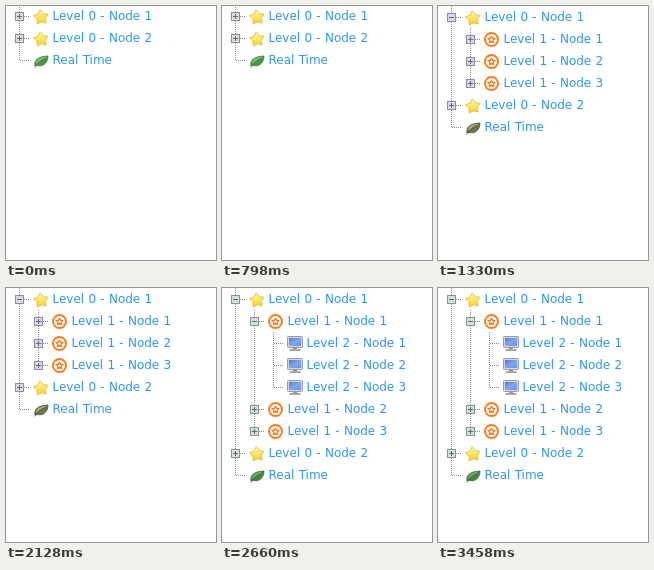
An HTML page that plays this animation: 210x254 px, repeating every 3.99 s.

```html
<!DOCTYPE html>
<html lang="en">
<head>
<meta charset="utf-8">
<title>Tree view</title>
<style>
  html, body { margin: 0; width: 100%; height: 100%; overflow: hidden; background: #fff; }
  svg { display: block; }
  text { font: 12px Verdana, "DejaVu Sans", sans-serif; word-spacing: .45px; fill: #3096ec; }
  .dots { fill: none; stroke: #858585; stroke-dasharray: 1 1; }
  .box { fill: var(--box); stroke: var(--rim); }
  .sign { stroke: var(--sign); }
</style>
</head>
<body>
<svg width="210" height="254" viewBox="0 0 210 254">
  <defs>
    <linearGradient id="gold" x2="0" y2="1">
      <stop offset="0" stop-color="#fffbb4"/><stop offset=".5" stop-color="#ffe95c"/><stop offset="1" stop-color="#f8c531"/>
    </linearGradient>
    <linearGradient id="screen" x2="1" y2="1">
      <stop offset="0" stop-color="#4f7cd6"/><stop offset=".5" stop-color="#7fa6ee"/><stop offset="1" stop-color="#6a94e6"/>
    </linearGradient>
    <path id="star" fill="url(#gold)" stroke="#e9bf45" stroke-linejoin="round"/>
    <g id="ring">
      <circle cx="7.5" cy="7.5" r="6.5" fill="#fff" stroke="#fb7c1c" stroke-width="2"/>
      <path id="ringStar" fill="#fff" stroke="#fb7c1c" stroke-width="1.4" stroke-linejoin="round"/>
    </g>
    <g id="monitor">
      <rect x=".5" y=".5" width="15" height="11" rx="1" fill="#d5d7db" stroke="#9a9ca2"/>
      <rect x="2" y="2" width="12" height="8" fill="url(#screen)"/>
      <path d="M6 12h4v1h-4z" fill="#8e9096"/>
      <rect x="2.500" y="13" width="11" height="2" rx=".5" fill="#a5a7ac"/>
    </g>
    <g id="leaf">
      <path d="M2 13C1 7 5 3.500 15 3C15 9 11 14 4.500 12.500Z" fill="var(--leaf)" stroke="var(--edge)" stroke-width=".8" stroke-linejoin="round"/>
      <path d="M3 11C3 7 6 4.500 14 3.800C10 6 7 8 3 11Z" fill="var(--shine)"/>
      <path d="M1.500 14.500C5 9.500 8 7.500 12 5.800" fill="none" stroke="var(--edge)" stroke-width=".8"/>
    </g>
  </defs>
  <g id="tree"></g>
</svg>
<script>
const ROW = 22, INDENT = 19, STEP = 1330;
const tree = document.getElementById("tree");

// Colours for each expansion depth.
const themes = [
  { leaf: "#4c9448", edge: "#3b7a3c", shine: "#86bf7c", box: "#dcdcdc", rim: "#8c8c8c", sign: "#666" },
  { leaf: "#6f764a", edge: "#4a4e36", shine: "#a3a97c", box: "#dad8e6", rim: "#8f8ca0", sign: "#69667c" },
  { leaf: "#478543", edge: "#3a6b3a", shine: "#78a870", box: "#d6e0da", rim: "#88938d", sign: "#5f6c65" }
];

function starPath(cx, cy, outer, inner, turn) {
  let d = "";
  for (let i = 0; i < 10; i++) {
    const a = (i * 36 - 90 + turn) * Math.PI / 180, r = i % 2 ? inner : outer;
    d += (i ? "L" : "M") + (cx + r * Math.cos(a)).toFixed(2) + " " + (cy + r * Math.sin(a)).toFixed(2);
  }
  return d + "Z";
}
document.getElementById("star").setAttribute("d", starPath(8, 8.4, 7.7, 4.3, -6));
document.getElementById("ringStar").setAttribute("d", starPath(7.5, 7.7, 3.5, 1.8, 0));

const node = (level, n, open) => ({ level, open, label: `Level ${level} - Node ${n}`, icon: ["star", "ring", "monitor"][level], leaf: level === 2 });

// Visible rows after a number of expansions.
function rowsAt(depth) {
  const rows = [node(0, 1, depth > 0)];
  if (depth > 0) {
    for (let n = 1; n <= 3; n++) {
      rows.push(node(1, n, n === 1 && depth > 1));
      if (n === 1 && depth > 1) for (let k = 1; k <= 3; k++) rows.push(node(2, k));
    }
  }
  rows.push(node(0, 2), { level: 0, label: "Real Time", icon: "leaf", leaf: true });
  return rows;
}

function toggle(x, y, open) {
  return `<rect class="box" x="${x - 3.5}" y="${y - 3.5}" width="8" height="8"/>
    <path class="sign" d="M${x - 2} ${y + .5}h5${open ? "" : `M${x + .5} ${y - 2}v5`}"/>`;
}

function draw(depth) {
  const rows = rowsAt(depth);
  let lines = "", parts = "";
  for (let level = 0; level <= depth; level++) {
    const first = rows.findIndex(r => r.level === level);
    const last = rows.map(r => r.level).lastIndexOf(level);
    lines += `<path class="dots" d="M${13.5 + level * INDENT} ${first * ROW - 1}V${last * ROW + 11}"/>`;
  }
  rows.forEach((r, i) => {
    const x = 13 + r.level * INDENT, y = 10 + i * ROW;
    lines += `<path class="dots" d="M${x + 1} ${y + .5}H${x + 10}"/>`;
    if (!r.leaf) parts += toggle(x, y, r.open);
    parts += `<use href="#${r.icon}" x="${x + 14}" y="${y - 7}"/><text x="${x + 33.5}" y="${y + 4}">${r.label}</text>`;
  });
  for (const [name, color] of Object.entries(themes[depth])) tree.style.setProperty("--" + name, color);
  // The open tree sits one pixel lower.
  tree.setAttribute("transform", `translate(0 ${depth ? 1 : 0})`);
  tree.innerHTML = lines + parts;
}

let shown = -1;
const start = performance.now();
function tick() {
  const depth = Math.floor((performance.now() - start) / STEP) % 3;
  if (depth !== shown) draw(shown = depth);
  requestAnimationFrame(tick);
}
tick();
</script>
</body>
</html>
```
